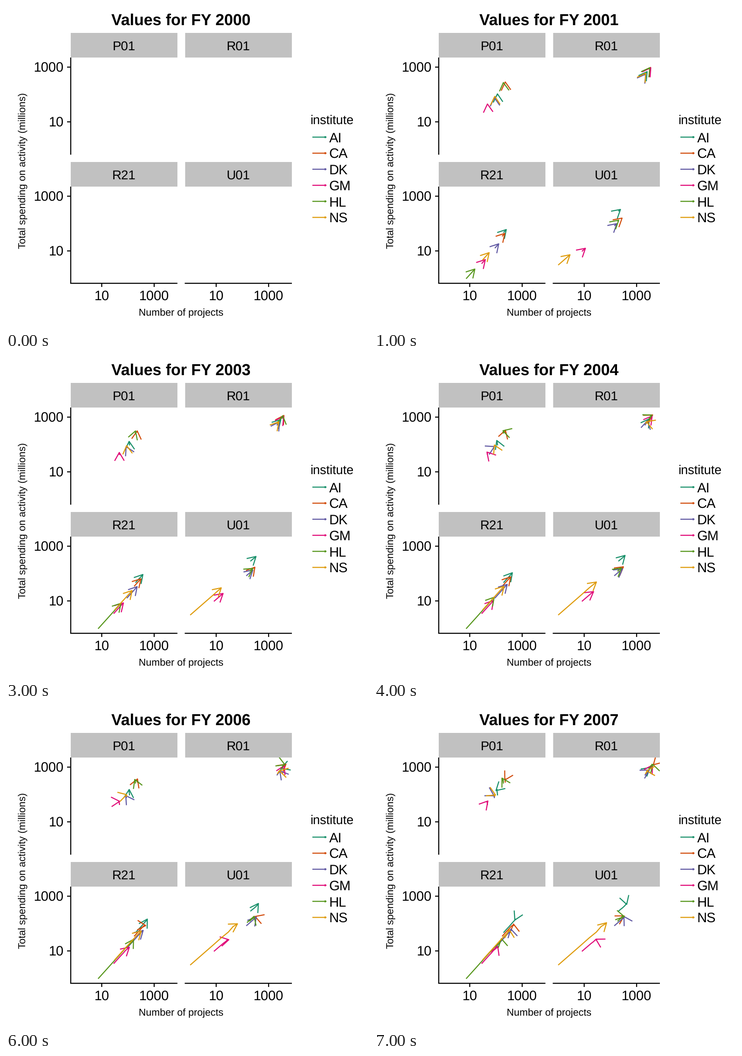
A matplotlib script that plays this animation: 794x706 px, repeating every 8 s.

```python
import matplotlib.pyplot as plt
import numpy as np
from matplotlib.animation import FuncAnimation
from matplotlib.patches import Rectangle

W, H, DPI = 794, 706, 100
YEARS = 8
LINE = 2.3
HEAD = 21
DRIFT = 1.5
NAMES = ["AI", "CA", "DK", "GM", "HL", "NS"]
COLORS = ["#178f69", "#d14a08", "#5f57a2", "#e00877", "#55951a", "#de9a08"]
PANEL_W, PANEL_H, STRIP_H = 234, 212, 54

plt.rcParams["font.family"] = "Liberation Sans"
plt.rcParams["text.hinting"] = "none"

# Panel: name, left, top, heading in degrees, then per institute (x, y, growth).
PANELS = [
    ("P01", 142, 113, 95,
     [(271, 196, 14), (288, 168, 6), (264, 202, 5), (249, 217, 9), (284, 170, 9), (265, 199, 4)]),
    ("R01", 393, 113, 55,
     [(597, 147, 15), (605, 137, 12), (594, 152, 14), (606, 137, 8), (603, 138, 13), (595, 149, 9)]),
    ("R21", 142, 396, 48,
     [(284, 497, 38), (281, 505, 36), (265, 531, 53), (236, 565, 50), (202, 598, 118), (238, 557, 90)]),
    ("U01", 393, 396, 41,
     [(536, 450, 25), (543, 466, 6), (527, 482, 30), (456, 538, 42), (534, 472, 15), (404, 568, 142)]),
]

fig = plt.figure(figsize=(W / DPI, H / DPI), dpi=DPI, facecolor="white")
ax = fig.add_axes([0, 0, 1, 1])
ax.set_xlim(0, W)
ax.set_ylim(H, 0)
ax.axis("off")
rng = np.random.default_rng(4)


def pt(px):
    return px * 72 / DPI


def label(x, y, text, px, ha="center", **kw):
    return ax.text(x, y, text, fontsize=pt(px), ha=ha, va="baseline", **kw)


def stroke(xs, ys, color="black"):
    return ax.plot(xs, ys, color=color, lw=pt(LINE), solid_capstyle="butt",
                   solid_joinstyle="round", snap=False)[0]


def yearly_path(x, y, growth, heading):
    """Growth that slows down along a heading, with drift that builds up."""
    t = np.linspace(0, 1, YEARS)
    dist = growth * (1 - (1 - t) ** 1.8)
    a = np.radians(heading)
    line = np.column_stack([x + dist * np.cos(a), y - dist * np.sin(a)])
    return line + rng.normal(0, DRIFT, (YEARS, 2)) * t[:, None] ** 2


def barbs(tail, tip, size):
    """Open arrow head of 60 degrees at the end of a segment."""
    dx, dy = np.subtract(tip, tail)
    turn = np.arctan2(dy, dx) + np.pi + np.radians([-30, 30])
    ends = np.array(tip) + size * np.column_stack([np.cos(turn), np.sin(turn)])
    return np.array([ends[0], tip, ends[1]])


def draw_panel(name, left, top, heading, series):
    right, bottom = left + PANEL_W, top + PANEL_H
    ax.add_patch(Rectangle((left, top - STRIP_H), PANEL_W, STRIP_H, fc="#c1c1c1", lw=0))
    label(left + PANEL_W / 2, top - 16, name, 28.3)
    if left < 200:
        stroke([left, left], [top, bottom + 1])
        for dy, text in ((21, "1000"), (141, "10")):
            stroke([left - 8, left], [top + dy] * 2)
            label(left - 15.3, top + dy + 11, text, 29.6, ha="right")
    if top > 200:
        stroke([left - 1, right], [bottom, bottom])
        for dx, text in ((68, "10"), (183, "1000")):
            stroke([left + dx] * 2, [bottom, bottom + 8])
            label(left + dx, bottom + 38, text, 29.6)

    clip = Rectangle((left, top), PANEL_W, PANEL_H, transform=ax.transData)
    for start, color in zip(series, COLORS):
        trail, head = stroke([], [], color), stroke([], [], color)
        trail.set_clip_path(clip)
        head.set_clip_path(clip)
        arrows.append((yearly_path(*start, heading), trail, head))


def draw_legend():
    label(667, 259, "institute", 27.6, ha="left")
    for i, (name, color) in enumerate(zip(NAMES, COLORS)):
        y = 287.5 + 35.2 * i
        stroke([672, 702], [y, y], color)
        stroke(*barbs((672, y), (702, y), 3.5).T, color)
        label(708.7, y + 11.5, name, 29.6, ha="left")


arrows = []
title = label(383.6, 42, "", 34.6, weight="bold")
for panel in PANELS:
    draw_panel(*panel)
draw_legend()
label(384, 679.5, "Number of projects", 22)
label(43.5, 361, "Total spending on activity (millions)", 22.2,
      rotation=90, rotation_mode="anchor")


def update(year):
    title.set_text(f"Values for FY {2000 + year}")
    for points, trail, head in arrows:
        if year == 0:
            trail.set_data([], [])
            head.set_data([], [])
        else:
            trail.set_data(*points[:year + 1].T)
            head.set_data(*barbs(points[year - 1], points[year], HEAD).T)
    return []


anim = FuncAnimation(fig, update, frames=YEARS, interval=1000, repeat=True,
                     repeat_delay=0, init_func=lambda: update(0))
plt.show()
```
